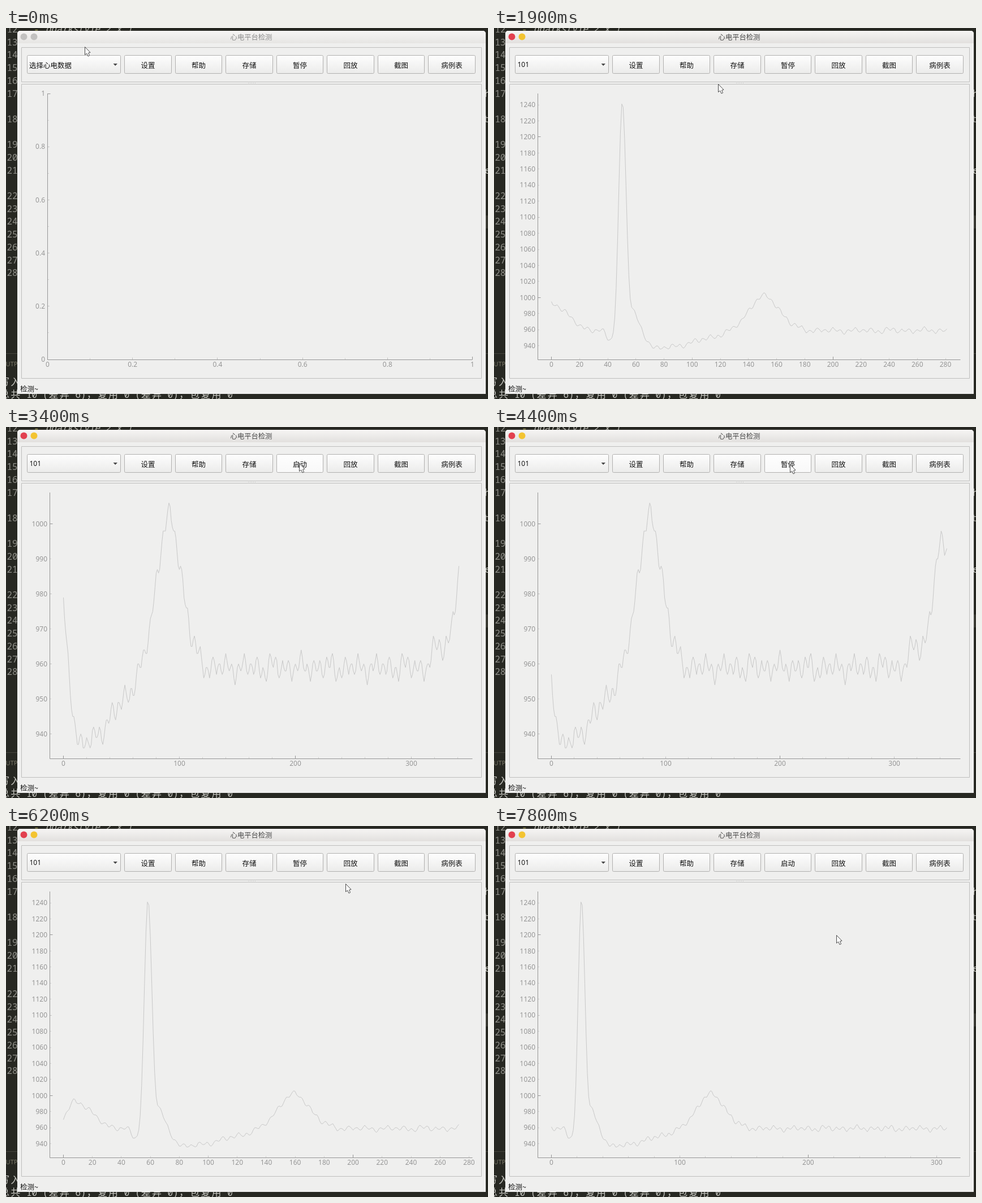
An HTML page with a canvas for the animation above (8000 ms loop, 852x657 px).

```html
<!DOCTYPE html>
<html lang="zh">
<head>
<meta charset="utf-8">
<style>
html, body { margin: 0; width: 100%; height: 100%; overflow: hidden; background: #272822; }
canvas { display: block; }
</style>
</head>
<body>
<canvas id="stage" width="852" height="657"></canvas>
<script>
const ctx = document.getElementById('stage').getContext('2d');
const LOOP = 8000, RATE = 58 / 1200;
const CJK = '"Noto Sans CJK SC", "Noto Sans CJK", sans-serif';
const SANS = '"Noto Sans", sans-serif';
const MONO = '"Noto Sans Mono", "DejaVu Sans Mono", monospace';

// Heartbeat waves: centre, height, width to the left, width to the right
const WAVES = [
  [29, 34, 5.5, 11],
  [71, -13, 3, 3],
  [79.4, 286.5, 2.5, 2.6],
  [87.5, 22, 3, 3],
  [104, -22, 6, 28],
  [180, 43, 11, 11],
  [412, 6, 4, 4],
  [437, 36, 9, 14]
];

function sample(n) {
  const ripple = (size, period) => -size * Math.cos((n - 123) / period * 2 * Math.PI);
  let v = 959 + ripple(2.2, 5.43) + ripple(1.6, 12.67) + ripple(0.9, 22.8);
  for (const [mid, height, wl, wr] of WAVES) {
    const d = (n - mid) / (n < mid ? wl : wr);
    v += height * Math.exp(-d * d / 2);
  }
  return Math.max(936, Math.round(v));
}

const DATA = Array.from({ length: 500 }, (_, n) => sample(n));

// Stretches in which the trace scrolls, and moments when the window stalls
const RUNS = [
  { from: 1300, to: 3140, first: 0 },
  { from: 4300, to: 5000, first: 89 },
  { from: 5766, to: 6925, first: 0 }
];
const STALLS = [[3100, 3400], [6900, 7100]];

function trace(time) {
  const stall = STALLS.find(([a, b]) => time >= a && time < b);
  const t = stall ? stall[0] : time;
  const run = RUNS.findLast(r => t >= r.from);
  if (!run) return { paused: false };
  const first = Math.round(run.first + (Math.min(t, run.to) - run.from) * RATE);
  return { first, paused: t >= run.to };
}

// Pointer moves: start, end, x, y
const MOVES = [
  [200, 400, 46, 67],
  [700, 900, 127, 85],
  [1300, 2500, 664, 112],
  [2500, 3100, 518, 64],
  [3600, 4900, 526, 68],
  [5200, 5700, 600, 65],
  [5900, 6200, 600, 102],
  [6200, 6800, 519, 66],
  [7100, 7300, 494, 209],
  [7400, 7800, 605, 193]
];

function pointer(t) {
  let x = 139, y = 33;
  for (const [a, b, tx, ty] of MOVES) {
    const f = Math.max(0, Math.min(1, (t - a) / (b - a)));
    x += (tx - x) * f;
    y += (ty - y) * f;
  }
  return [Math.round(x), Math.round(y)];
}

function text(str, x, y, font, color, align = 'left') {
  ctx.font = font;
  ctx.fillStyle = color;
  ctx.textAlign = align;
  ctx.fillText(str, x, y);
}

function line(x1, y1, x2, y2, color) {
  ctx.strokeStyle = color;
  ctx.lineWidth = 1;
  ctx.beginPath();
  ctx.moveTo(x1, y1);
  ctx.lineTo(x2, y2);
  ctx.stroke();
}

function vgrad(y1, y2, c1, c2) {
  const g = ctx.createLinearGradient(0, y1, 0, y2);
  g.addColorStop(0, c1);
  g.addColorStop(1, c2);
  return g;
}

function box(x, y, w, h, r, fill, stroke) {
  ctx.beginPath();
  ctx.roundRect(x, y, w, h, r);
  if (fill) { ctx.fillStyle = fill; ctx.fill(); }
  if (stroke) { ctx.strokeStyle = stroke; ctx.lineWidth = 1; ctx.stroke(); }
}

function dot(x, y, r, color) {
  ctx.fillStyle = color;
  ctx.beginPath();
  ctx.arc(x, y, r, 0, 7);
  ctx.fill();
}

// Terminal text: Chinese characters take two cells
function cells(str, x, y, color) {
  for (const ch of str) {
    const wide = ch > '\u2fff';
    if (wide) text(ch, x + 9.6, y, '17px ' + CJK, color, 'center');
    else text(ch, x, y, '16px ' + MONO, color);
    x += wide ? 19.2 : 9.6;
  }
}

function editor() {
  const code = '16px ' + MONO, row = 22.7;
  ctx.fillStyle = '#272822';
  ctx.fillRect(0, 0, 852, 657);
  for (let n = 12, y = 8; n <= 28; n++) {
    text(n, 1.5, Math.round(y), code, '#90908a');
    const wrapped = n === 17 || n === 18 || n === 21;
    y += wrapped ? 2 * row : row;
  }
  text('-', 49, 8, code, '#a09a50');
  text('qdarkstyle 2.x.1', 70, 7, 'italic ' + code, '#b8b8b0');
  ctx.fillStyle = '#3a3a33';
  ctx.fillRect(846, 332, 6, 23);
  text('h', 846, 122, code, '#d0d0c8');
  text('t', 844, 167, code, '#b0b0a8');
  text('e', 846, 258, code, '#d0d0c8');
  line(0, 576.5, 852, 576.5, '#46463e');
  text('OUTPUT', -9, 599, '11px ' + SANS, '#7a7868');
  cells('写入', -12, 633, '#c6c6c0');
  cells('总共 10 (差异 6)，复用 0 (差异 0)，包复用 0', -12, 655, '#c6c6c0');
}

function field(x, right, hot) {
  box(x + 0.5, 48.5, right - x, 32, 2, vgrad(48, 81, '#fefefe', hot ? '#f8f8f8' : '#ebebea'), '#b1b0af');
}

function chrome(t, mx, my) {
  const active = t >= 600, ui = '12.5px ' + CJK;
  box(20, 5, 828, 643, [5, 5, 0, 0], '#efefee');
  box(20, 5, 828, 22, [5, 5, 0, 0], vgrad(5, 27, '#f6f5f4', active ? '#e2e0de' : '#e6e5e3'));
  dot(31.5, 15.5, 6, active ? '#e2404f' : '#c2c1c0');
  dot(49.5, 15.5, 6, active ? '#f3c431' : '#c2c1c0');
  text('心电平台检测', 433.5, 21, '12.3px ' + CJK, active ? '#484848' : '#8c8c8c', 'center');

  box(27.5, 34.5, 813, 61, 0, null, '#bebebd');
  box(27.5, 99.5, 813, 521, 0, null, '#bebebd');
  ctx.fillStyle = '#c4c4c3';
  for (let x = 428; x < 443; x += 3) ctx.fillRect(x, 97, 1, 1);

  const row = active && my >= 48 && my <= 81;
  field(37, 202, row && mx >= 37 && mx <= 202);
  if (t < 800) text('选择心电数据', 41, 71, ui, '#111');
  else text('101', 41.5, 69, '12px ' + SANS, '#111');
  ctx.fillStyle = '#4a4a4a';
  ctx.beginPath();
  ctx.moveTo(189.5, 63);
  ctx.lineTo(197, 63);
  ctx.lineTo(193.2, 67);
  ctx.fill();

  const labels = ['设置', '帮助', '存储', trace(t).paused ? '启动' : '暂停', '回放', '截图', '病例表'];
  labels.forEach((label, i) => {
    const left = 209 + i * 89.5, x = Math.ceil(left), right = Math.floor(left + 83);
    field(x, right, row && mx >= x && mx <= right);
    text(label, left + 42, 71, ui, '#111', 'center');
  });
  text('检测~', 25, 644, ui, '#111');
}

// Tick spacings from coarse to fine
function spacing(range, size) {
  const best = range / Math.log(size);
  const unit = 10 ** Math.floor(Math.log10(best));
  const steps = [1, 2, 10, 20, 100].map(v => v * unit);
  let i = 0;
  while (steps[i + 1] <= best) i++;
  return [steps[i + 2], steps[i + 1], steps[i]];
}

function ticks(lo, hi, size, depth, draw) {
  const seen = new Set();
  spacing(hi - lo, size).forEach((step, level) => {
    for (let k = Math.ceil(lo / step - 1e-6); k * step <= hi + step * 1e-6; k++) {
      const v = +(k * step).toFixed(4);
      if (seen.has(v)) continue;
      seen.add(v);
      draw(v, 5 / (level * 0.5 + 1), `rgba(150,150,150,${1 / (level + 1)})`, level < depth);
    }
  });
}

function axes(left, view, depthX, depthY) {
  const [x0, x1, y0, y1] = view, right = 824.5, top = 116, bottom = 587;
  const px = v => left + (v - x0) / (x1 - x0) * (right - left);
  const py = v => bottom - (v - y0) / (y1 - y0) * (bottom - top);
  const font = '12px ' + SANS, gray = '#969696';
  line(left, top, left, bottom + 0.5, gray);
  line(left, bottom + 0.5, right, bottom + 0.5, gray);
  ticks(x0, x1, right - left, depthX, (v, len, color, label) => {
    const x = Math.floor(px(v)) + 0.5;
    line(x, bottom, x, bottom - len, color);
    if (label) text(v, px(v), 600, font, gray, 'center');
  });
  ticks(y0, y1, bottom - top, depthY, (v, len, color, label) => {
    const y = Math.floor(py(v)) + 0.5;
    line(left, y, left + len, y, color);
    if (label) text(v, left - 4.5, Math.round(py(v) + 4.2), font, gray, 'right');
  });
  return [px, py];
}

function plot(t) {
  const { first } = trace(t);
  if (first === undefined) {
    axes(73.5, [0, 1, 0, 1], 2, 2);
    return;
  }
  // The visible length grows as fast as the start moves on
  const last = 252 + first, part = DATA.slice(first, first + last + 1);
  const min = Math.min(...part), max = Math.max(...part);
  const padX = last * 24 / 699, padY = (max - min) * 18.6 / 433.8;
  const view = [-padX, last + padX, min - padY, max + padY];
  const [px, py] = axes(77.5, view, view[1] < 300 ? 3 : 2, 3);
  ctx.strokeStyle = '#c8c8c8';
  ctx.lineWidth = 1;
  ctx.lineJoin = 'round';
  ctx.beginPath();
  part.forEach((v, i) => ctx.lineTo(px(i), py(v)));
  ctx.stroke();
}

function shape(x, y, pts) {
  ctx.beginPath();
  for (const [dx, dy] of pts) ctx.lineTo(x + dx, y + dy);
  ctx.closePath();
  ctx.fillStyle = '#fafafa';
  ctx.strokeStyle = '#4c4c4c';
  ctx.lineWidth = 1;
  ctx.fill();
  ctx.stroke();
}

const ARROW = [[0.5, 0.5], [0.5, 14.5], [3.7, 12], [6, 17], [8.6, 15.8], [6.6, 11.2], [10, 10.3]];
const ARM = [[-1, -1], [-1, -4.5], [-3, -4.5], [0, -8], [3, -4.5], [1, -4.5]];
const CROSS = [0, 1, 2, 3].flatMap(turns => ARM.map(([x, y]) => {
  for (let i = 0; i < turns; i++) [x, y] = [-y, x];
  return [x, y];
}));

function frame(now) {
  const t = Math.floor(now % LOOP / 100) * 100;
  const [mx, my] = pointer(t);
  editor();
  chrome(t, mx, my);
  plot(t);
  const cross = t < 3000 && my > 100;
  shape(mx, my, cross ? CROSS : ARROW);
}

let start;
function loop(now) {
  start ??= now;
  frame(Math.max(0, now - start));
  requestAnimationFrame(loop);
}
frame(0);
requestAnimationFrame(loop);
</script>
</body>
</html>
```
